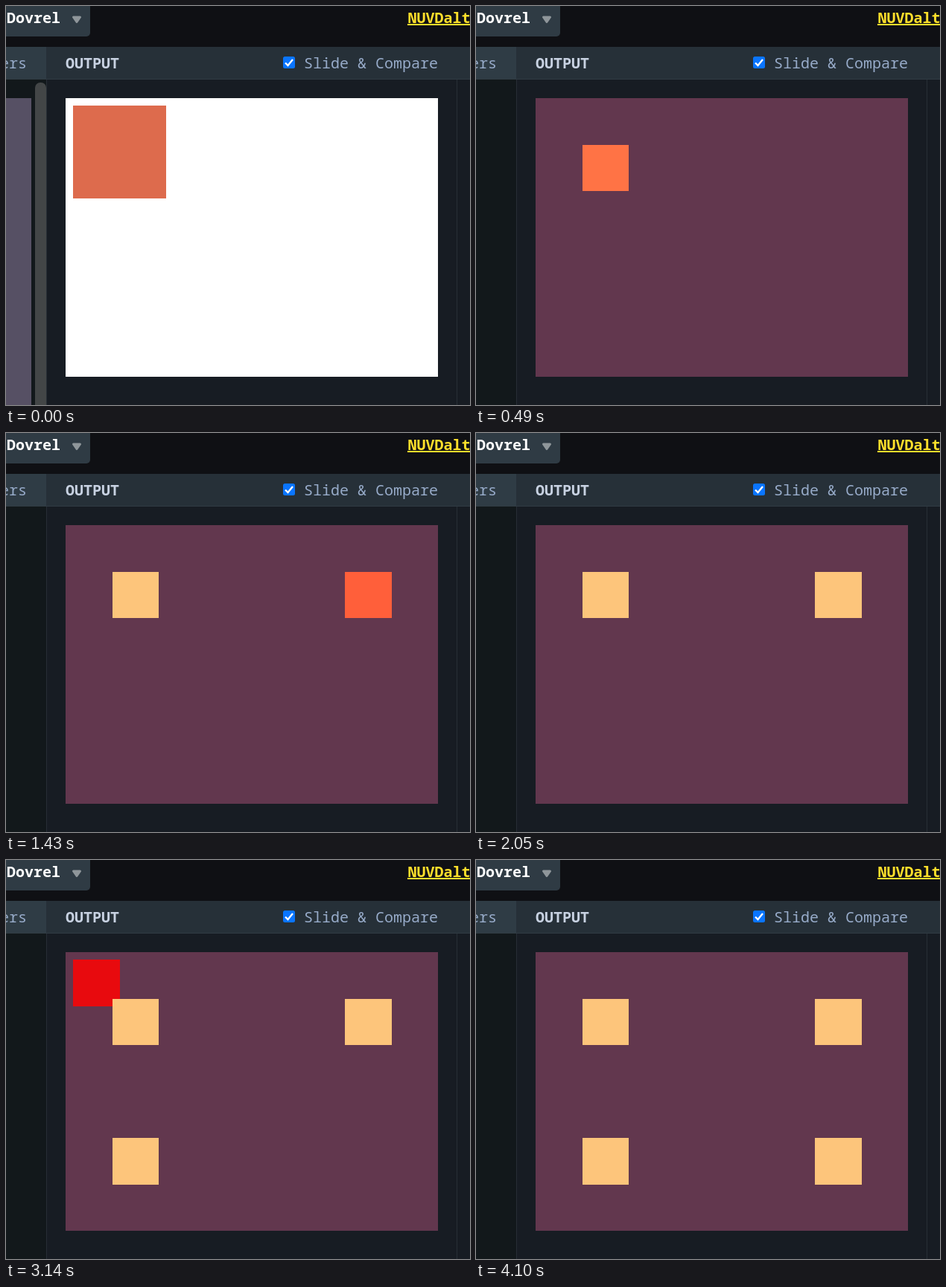
An HTML page with a canvas for the animation above (4170 ms loop, 623x537 px).

```html
<!DOCTYPE html>
<html lang="en">
<head>
<meta charset="utf-8">
<title>Output panel</title>
<style>
  html, body { margin: 0; width: 100%; height: 100%; overflow: hidden; background: #0f1014; }
  svg, canvas { position: absolute; left: 0; top: 0; display: block; }
  text { font: 500 20px "Noto Sans Mono", "DejaVu Sans Mono", monospace; white-space: pre; }
  .bold { font-weight: 700; }
</style>
</head>
<body>
<svg width="623" height="537" viewBox="0 0 623 537">
  <rect width="623" height="537" fill="#0f1014"/>
  <path d="M0 0H113V36a5 5 0 0 1-5 5H0Z" fill="#2f3b44"/>
  <path d="M90.5 15H99.5L95 21.5Z" fill="#8f969a" stroke="#8f969a" stroke-width="3" stroke-linejoin="round"/>
  <rect y="55" width="623" height="43" fill="#263038"/>
  <rect y="55" width="54" height="43" fill="#2f3c45"/>
  <rect y="98" width="623" height="1" fill="#303b43"/>
  <rect y="99" width="623" height="438" fill="#171c23"/>
  <rect y="99" width="54" height="438" fill="#12181b"/>
  <path d="M54.5 99V537M605.5 99V537" stroke="#272e35"/>
  <rect x="372" y="68" width="16" height="16" rx="2.5" fill="#0a75ff"/>
  <path d="M375 76.5L378.5 80L385 72" fill="none" stroke="#fff" stroke-width="2.3"/>
  <text class="bold" x="1" y="23" fill="#fff">Dovrel</text>
  <text x="539.5" y="23" fill="#ffdf2b" style="font-weight:600">NUVDalt</text>
  <rect x="539" y="24" width="84" height="2" fill="#ffdf2b"/>
  <text x="-8" y="84" fill="#97abc9">ers</text>
  <text class="bold" x="80" y="84" fill="#c8d2e2">OUTPUT</text>
  <text x="400" y="84" fill="#97abc9">Slide &amp; Compare</text>
</svg>
<canvas id="stage" width="623" height="537"></canvas>
<script>
const ctx = document.getElementById('stage').getContext('2d');
const LOOP = 4170;
const HOME = [90, 134];
const REST = '#fdc57b';
const FADE = ['#e80a0e', '#f83a22', '', '#fe9860', '#fdbf77', REST];

// steps: appear, brighten, move into place, then settle
const tiles = [
  { x: 142.5, y: 186.5, mid: '#ff7345', steps: [170, 320, 490, 640, 810, 810] },
  { x: 455, y: 186.5, mid: '#ff5f3a', steps: [1110, 1280, 1430, 1580, 1750, 2050] },
  { x: 142.5, y: 374, mid: '#ff663d', steps: [2200, 2370, 2530, 2670, 2840, 2840] },
  { x: 455, y: 374, mid: '#ff663d', steps: [3140, 3310, 3460, 3610, 3780, 4100] }
];

function rect(x, y, w, h, color) {
  const left = Math.round(x), top = Math.round(y);
  ctx.fillStyle = color;
  ctx.fillRect(left, top, Math.round(x + w) - left, Math.round(y + h) - top);
}

function drawStart() {
  rect(0, 124, 34, 413, '#565064');
  ctx.fillStyle = '#434647';
  ctx.beginPath();
  ctx.roundRect(39, 103, 15, 450, 7);
  ctx.fill();
  rect(80, 124, 500, 375, '#fff');
  rect(...HOME, 125, 125, '#dd6b4d');
}

function drawTile(tile, time) {
  const step = tile.steps.filter(at => at <= time).length - 1;
  if (step < 0) return;
  const [x, y] = step < 2 ? HOME : [tile.x, tile.y];
  rect(x, y, 62.5, 62.5, FADE[step] || tile.mid);
}

function draw(time) {
  ctx.clearRect(0, 0, 623, 537);
  if (time < 170) return drawStart();
  rect(80, 124, 500, 375, '#62374e');
  // Earlier tiles stay on top of the incoming one
  for (const tile of [...tiles].reverse()) drawTile(tile, time);
}

const start = performance.now();
function tick() {
  draw((performance.now() - start) % LOOP);
  requestAnimationFrame(tick);
}
tick();
</script>
</body>
</html>
```
